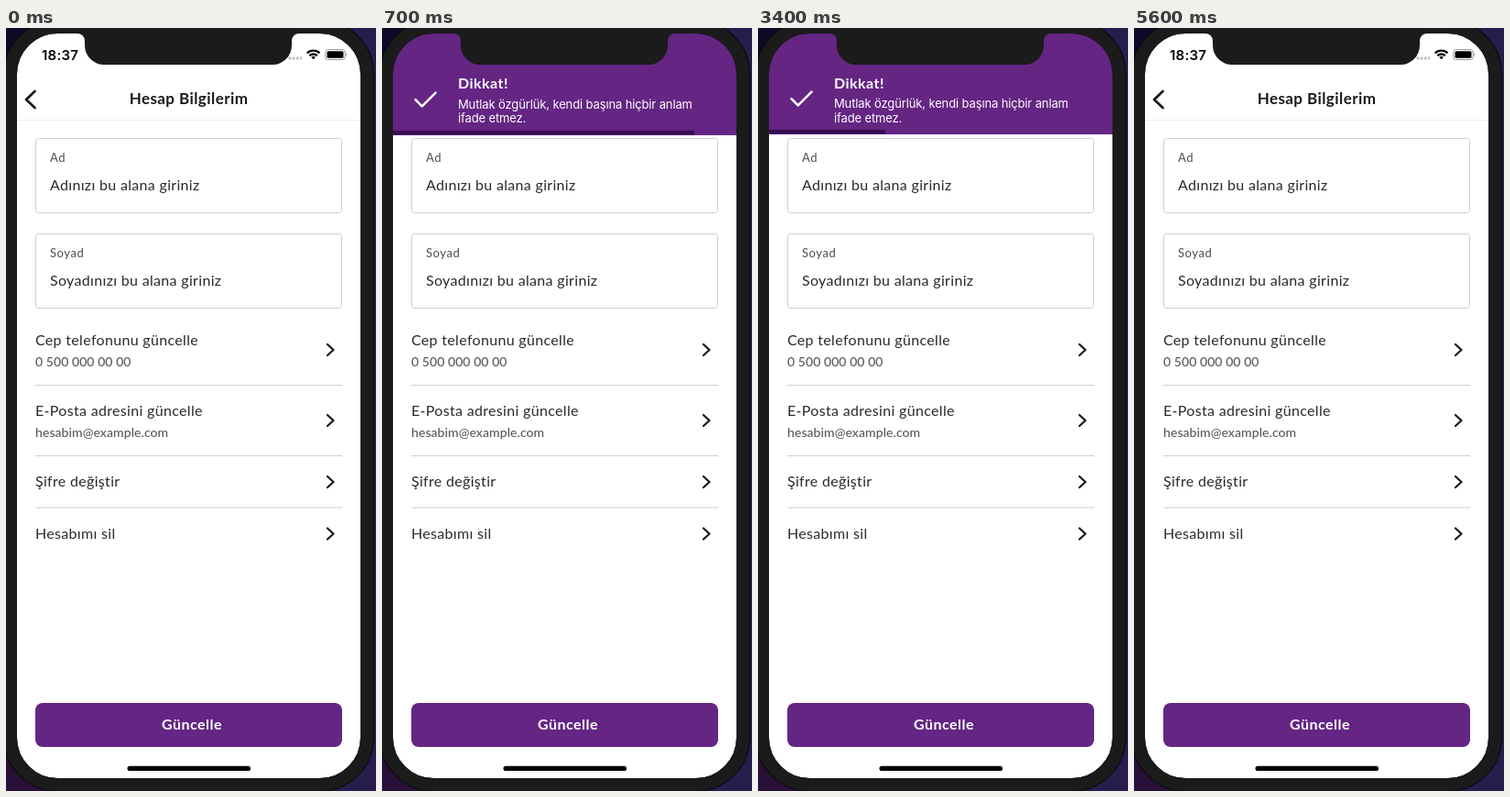
Write an HTML page that moves like this. It is 404 by 832 pixels and loops after 5.7 s.

```html
<!DOCTYPE html>
<html lang="tr">
<head>
<meta charset="utf-8">
<title>Hesap Bilgilerim</title>
<style>
  html, body { margin: 0; width: 100%; height: 100%; overflow: hidden; background: #1b1b1b; }
  svg { display: block; }
  text { font: 16px Lato, "Open Sans", sans-serif; letter-spacing: .02em; fill: #2a2a2c; }
  .bold { font-weight: 700; letter-spacing: .03em; }
  .small { font-size: 14px; font-weight: 500; letter-spacing: .005em; fill: #58585a; }
  .label { font-size: 13px; font-weight: 500; letter-spacing: .04em; fill: #58585a; }
  .title { font-size: 17px; font-weight: 700; letter-spacing: .025em; fill: #1b1b1d; }
  .clock { font: 600 15px Inter, sans-serif; letter-spacing: .015em; fill: #000; }
  .note { font: 13px Inter, sans-serif; letter-spacing: -.01em; }
  .white { fill: #fff; }
  .line { fill: none; stroke-linecap: round; stroke-linejoin: round; }
</style>
</head>
<body>
<svg width="404" height="832" viewBox="0 0 404 832">
  <defs>
    <clipPath id="screen"><rect x="9" y="3" width="381" height="818" rx="48"/></clipPath>
    <linearGradient id="desk" x1="0" y1="0" x2="0" y2="1">
      <stop offset="0" stop-color="#0d0a28"/>
      <stop offset="1" stop-color="#2a1038"/>
    </linearGradient>
  </defs>

  <rect width="404" height="832" fill="url(#desk)"/>
  <rect x="202" width="202" height="832" fill="#261d4c"/>

  <g clip-path="url(#screen)">
    <rect width="404" height="832" fill="#fff"/>
    <path class="line" d="M31.500 69 22 78l9.500 9" stroke="#1b1b1d" stroke-width="2.800"/>
    <text class="title" x="199.500" y="83" text-anchor="middle">Hesap Bilgilerim</text>
    <path d="M12 100.500H387" stroke="#eee"/>

    <g id="fields"></g>
    <g id="rows"></g>

    <rect x="32" y="736" width="335" height="48" rx="8" fill="#642583"/>
    <text class="bold white" x="203" y="765" text-anchor="middle">Güncelle</text>
    <rect x="132.500" y="804.700" width="134.500" height="5.400" rx="2.700" fill="#000"/>

    <g id="banner">
      <rect y="-14" width="404" height="130" fill="#642583"/>
      <path class="line" d="M36.500 77.200l7.200 7.200L58.500 69.600" stroke="#fff" stroke-width="2.500"/>
      <text class="bold white" x="83" y="65.500">Dikkat!</text>
      <text class="note white" x="83" y="87">Mutlak özgürlük, kendi başına hiçbir anlam</text>
      <text class="note white" x="83" y="102.500">ifade etmez.</text>
      <rect id="bar" x="12" y="111" height="4.500" fill="#380c50"/>
    </g>

    <g id="status">
      <text class="clock" x="39" y="34.500">18:37</text>
      <path d="M308.500 33H323" stroke="#000" stroke-opacity=".25" stroke-width="3" stroke-dasharray="2.800 1.400"/>
      <g fill="none" stroke="#000" stroke-width="2.300">
        <path d="M328.800 27.400a9.600 9.600 0 0 1 13.600 0"/>
        <path d="M331.400 30.200a6 6 0 0 1 8.400 0"/>
      </g>
      <path d="M335.600 34.200l-2.300-2.400a3.300 3.300 0 0 1 4.600 0z"/>
      <rect x="348.800" y="23.500" width="21.500" height="11" rx="3" fill="none" stroke="#000" stroke-opacity=".4"/>
      <rect x="350.500" y="25.200" width="18" height="7.600" rx="1.600"/>
      <path d="M371.500 27.200q2 1.800 0 3.600z" fill-opacity=".4"/>
    </g>
  </g>

  <g fill="none">
    <rect x="4.500" y="-1.500" width="390" height="827" rx="52" stroke="#080808" stroke-width="15"/>
    <rect x="5" y="-1" width="389" height="826" rx="51.500" stroke="#1b1b1b" stroke-width="14"/>
  </g>
  <path fill="#1b1b1b" d="M78 5v1a8 8 0 0 1 8 8v5a21 21 0 0 0 21 21H291a21 21 0 0 0 21-21v-5a8 8 0 0 1 8-8v-1z"/>
</svg>

<script>
const byId = id => document.getElementById(id);
const [banner, bar, status] = ["banner", "bar", "status"].map(byId);

const field = (y, label, hint) => `
  <rect x="32.500" y="${y + .5}" width="334" height="81" rx="3" fill="#fff" stroke="#d0d0d2"/>
  <text class="label" x="48" y="${y + 26}">${label}</text>
  <text x="48" y="${y + 57}">${hint}</text>`;

// y is the chevron's centre
const row = (y, label, detail, rule) => `
  <text x="32" y="${detail ? y - 5.5 : y + 5}">${label}</text>
  ${detail ? `<text class="small" x="32" y="${y + 18}">${detail}</text>` : ""}
  <path class="line" d="M351 ${y - 6}l6.500 6-6.500 6" stroke="#1b1b1d" stroke-width="2.300"/>
  ${rule ? `<path d="M32 ${rule}H367" stroke="#cfcfd1"/>` : ""}`;

byId("fields").innerHTML =
  field(120, "Ad", "Adınızı bu alana giriniz") +
  field(224, "Soyad", "Soyadınızı bu alana giriniz");

byId("rows").innerHTML =
  row(351, "Cep telefonunu güncelle", "0 500 000 00 00", 389.5) +
  row(428, "E-Posta adresini güncelle", "hesabim@example.com", 466.5) +
  row(495, "Şifre değiştir", "", 523) +
  row(551.5, "Hesabımı sil");

const LOOP = 5700, STEP = 100;
const OPEN = 87, CLOSE = 5420, COUNTDOWN = 5000;
const TRAVEL = 120, HALF_PERIOD = 210, BOUNCE = 0.2;
const clamp = v => Math.min(1, Math.max(0, v));

// Underdamped spring from 0 to 1; each swing keeps BOUNCE of the last one.
function spring(ms) {
  if (ms <= 0) return 0;
  const omega = Math.PI / HALF_PERIOD;
  const decay = -Math.log(BOUNCE) / HALF_PERIOD;
  return 1 - Math.exp(-decay * ms) *
    (Math.cos(omega * ms) + decay / omega * Math.sin(omega * ms));
}

function draw(time) {
  const t = Math.floor(time % LOOP / STEP) * STEP;
  const shown = spring(t - OPEN) - spring(t - CLOSE);
  banner.setAttribute("transform", `translate(0 ${(TRAVEL * (shown - 1)).toFixed(2)})`);
  bar.setAttribute("width", 375 * (1 - clamp((t - OPEN) / COUNTDOWN)));
  const fadeOut = clamp((t - OPEN) / 310);
  const fadeIn = clamp((t - CLOSE) / 180);
  status.setAttribute("opacity", 1 - fadeOut + fadeIn);
}

const start = performance.now();
function tick() {
  draw(performance.now() - start);
  requestAnimationFrame(tick);
}
tick();
</script>
</body>
</html>
```
